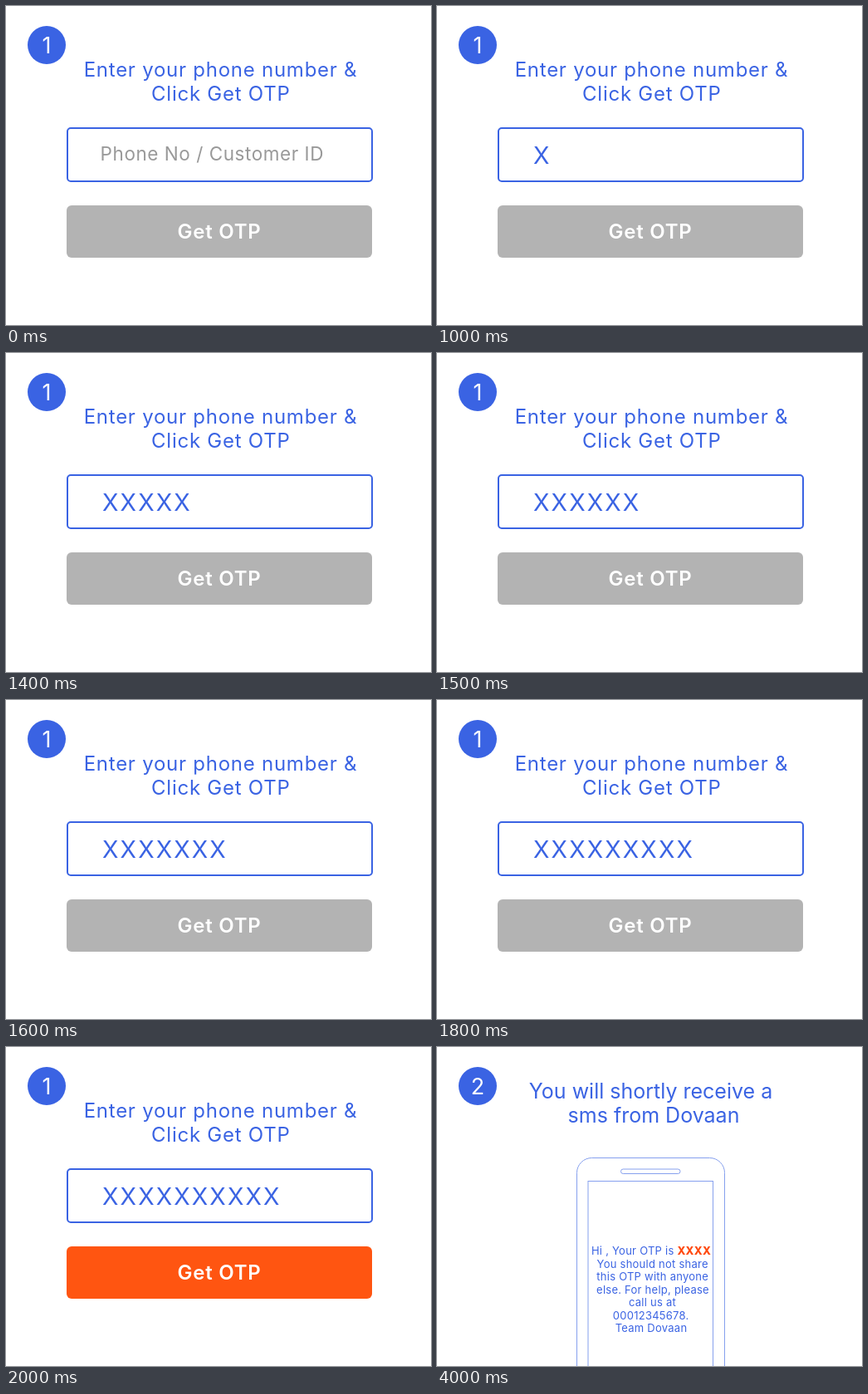
An HTML page for the animation above (8 s loop, 512 by 384 pixels).

```html
<!DOCTYPE html>
<html lang="en">
<head>
<meta charset="utf-8">
<title>OTP login steps</title>
<style>
  html, body { margin: 0; width: 100%; height: 100%; overflow: hidden; background: #fff; }
  svg { display: block; width: 100%; height: 100%; font-family: Inter, "Open Sans", sans-serif; fill: #3a63e3; }
  text { text-anchor: middle; }
  .badge { fill: #fff; font-size: 27px; }
  .heading { font-size: 24px; letter-spacing: .75px; }
  .title { font-size: 25px; }
  .sms { font-size: 13px; letter-spacing: .25px; }
  .code { fill: #ff4a10; font-weight: 800; }
  .line { fill: none; stroke: #86a0ee; }
</style>
</head>
<body>
<svg viewBox="0 0 512 384">
  <circle cx="49" cy="47" r="23"/>
  <text id="step" class="badge" x="49" y="57">1</text>

  <g id="entry">
    <g class="heading">
      <text x="258.5" y="85">Enter your phone number &amp;</text>
      <text x="258.8" y="114">Click Get OTP</text>
    </g>
    <rect x="74" y="147" width="367" height="64" rx="4" fill="none" stroke="#3a63e3" stroke-width="2"/>
    <text id="hint" x="248.3" y="185.5" fill="#999" font-size="22.5" letter-spacing=".55">Phone No / Customer ID</text>
    <text id="digits" y="190" font-size="28.5"></text>
    <rect id="button" x="73" y="240" width="368" height="63" rx="6"/>
    <text class="heading" x="257" y="280" fill="#fff" font-weight="600">Get OTP</text>
  </g>

  <g id="message">
    <g class="title">
      <text x="257.5" y="62">You will shortly receive a</text>
      <text x="261" y="91">sms from Dovaan</text>
    </g>
    <g class="line">
      <rect x="168.5" y="133.5" width="178" height="300" rx="18"/>
      <rect x="221.5" y="147" width="71.5" height="5.5" rx="2.75"/>
      <rect x="182" y="161.5" width="150.5" height="260"/>
    </g>
    <g class="sms">
      <text x="258" y="250">Hi , Your OTP is <tspan class="code">XXXX</tspan></text>
      <text x="259.7" y="265.5">You should not share</text>
      <text x="259.7" y="281">this OTP with anyone</text>
      <text x="260" y="297">else. For help, please</text>
      <text x="259.5" y="312">call us at</text>
      <text x="257.7" y="328">00012345678.</text>
      <text x="258" y="343">Team Dovaan</text>
    </g>
  </g>
</svg>
<script>
  const LOOP = 8000, TYPE_START = 1000, KEY_TIME = 100, ACTIVE = 2000, SECOND = 4000;
  const MAX_DIGITS = 10, FIRST_X = 125.8, PITCH = 21.55;
  const el = id => document.getElementById(id);
  const show = (id, on) => el(id).setAttribute("display", on ? "inline" : "none");

  // Each character gets its own centre so the pitch stays even.
  const centres = Array.from({ length: MAX_DIGITS }, (_, i) => FIRST_X + i * PITCH);
  el("digits").setAttribute("x", centres.join(" "));

  function draw(now) {
    const t = now % LOOP;
    const typed = Math.floor((t - TYPE_START) / KEY_TIME) + 1;
    const count = Math.max(0, Math.min(MAX_DIGITS, typed));
    show("entry", t < SECOND);
    show("message", t >= SECOND);
    show("hint", count === 0);
    el("step").textContent = t < SECOND ? "1" : "2";
    el("digits").textContent = "X".repeat(count);
    el("button").setAttribute("fill", t < ACTIVE ? "#b3b3b3" : "#ff5511");
  }

  const start = performance.now();
  function tick() {
    draw(performance.now() - start);
    requestAnimationFrame(tick);
  }
  tick();
</script>
</body>
</html>
```
